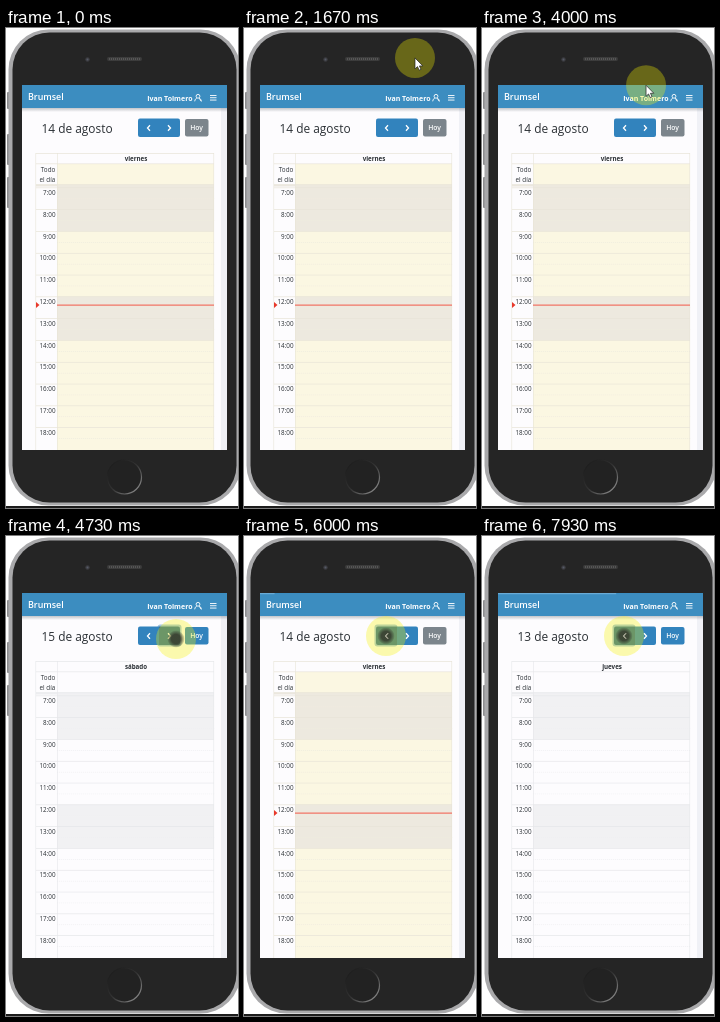
These frames come from a looping animation (232x480 px, 8000 ms). An HTML page with a canvas:

```html
<!DOCTYPE html>
<html lang="es">
<head>
<meta charset="utf-8">
<title>Agenda</title>
<style>
  html, body { margin: 0; width: 100%; height: 100%; overflow: hidden; background: #fff; }
  canvas { display: block; width: 232px; height: 480px; }
</style>
</head>
<body>
<canvas id="stage"></canvas>
<script>
const W = 232, H = 480, LOOP = 8000;
const FONT = '"Open Sans", "Noto Sans", sans-serif';
const BLUE = '#3c8dc0', BTN = '#3283bd', INK = '#2b3035', PAPER = '#fdfcfe';
const HOUR = 21.8, DAY_TOP = 159.5, COL = 51;

const canvas = document.getElementById('stage');
const ctx = canvas.getContext('2d');
const dpr = window.devicePixelRatio || 1;
canvas.width = W * dpr;
canvas.height = H * dpr;

// Pointer stops: time, x, y
const path = [
  [1190, 254, 92], [1400, 214, 76], [1670, 171, 30], [1930, 170, 19],
  [2200, 170, 19], [2730, 168, 9], [3930, 168, 9], [4000, 164, 57],
  [4330, 170, 103], [4870, 170, 103], [5270, 142, 100], [LOOP, 142, 100]
];

const between = (t, a, b) => t >= a && t < b;
const hourY = h => DAY_TOP + (h - 7) * HOUR;

function box(x, y, w, h, fill) {
  ctx.fillStyle = fill;
  ctx.fillRect(x, y, w, h);
}

function round(x, y, w, h, r, fill) {
  ctx.beginPath();
  ctx.roundRect(x, y, w, h, r);
  ctx.fillStyle = fill;
  ctx.fill();
}

function disc(x, y, r, fill) {
  ctx.beginPath();
  ctx.arc(x, y, r, 0, Math.PI * 2);
  ctx.fillStyle = fill;
  ctx.fill();
}

function line(points, color, width) {
  ctx.beginPath();
  points.forEach(([x, y], i) => i ? ctx.lineTo(x, y) : ctx.moveTo(x, y));
  ctx.strokeStyle = color;
  ctx.lineWidth = width;
  ctx.stroke();
}

function text(str, x, y, size, color, weight = 400, align = 'left') {
  ctx.font = `${weight} ${size}px ${FONT}`;
  ctx.textAlign = align;
  ctx.fillStyle = color;
  ctx.fillText(str, x, y);
}

function drawPhone() {
  box(0, 0, W, H, '#fff');
  [[64, 17], [106, 31], [149, 31]].forEach(([y, h]) => round(1, y, 3, h, 1, '#8c8c8e'));
  // The right edge runs past the stage
  round(2.5, 1.5, 232, 476, 40, '#a9a9ab');
  round(6.5, 4.5, 224, 470, 37, '#252525');
  box(0, 478, W, 2, '#1c1c1c');

  round(101, 29, 35, 4, 2, '#3c3c3c');
  for (let x = 103; x < 135; x += 2) box(x, 30, 1, 2, '#575757');
  disc(81.5, 31.5, 2.2, '#3d3d42');
  disc(81.5, 31.5, 1, '#555a66');

  disc(118.5, 449, 17.5, '#222');
  const rim = ctx.createLinearGradient(104, 436, 132, 464);
  rim.addColorStop(0, '#1c1c1c');
  rim.addColorStop(0.5, '#333');
  rim.addColorStop(1, '#8d8d8d');
  ctx.beginPath();
  ctx.arc(118.5, 449, 17, 0, Math.PI * 2);
  ctx.strokeStyle = rim;
  ctx.lineWidth = 1.2;
  ctx.stroke();
}

function drawHeader(t) {
  box(16, 57, 205, 365, '#f0f1f6');
  box(16, 80, 199, 342, PAPER);
  const shade = ctx.createLinearGradient(0, 80, 0, 84);
  shade.addColorStop(0, 'rgba(60,70,80,.3)');
  shade.addColorStop(1, 'rgba(60,70,80,0)');
  box(16, 80, 205, 4, shade);
  box(16, 57, 205, 23, BLUE);

  const load = [[4870, 5670], [5990, 6330], [7800, 8300]].find(([a, b]) => between(t, a, b));
  if (load) {
    const p = (t - load[0]) / (load[1] - load[0]);
    box(16, 57, 205 * Math.min(1, p * 2.2), 1.2, '#69abd6');
  }

  text('Brumsel', 22, 72.3, 8.9, '#fff', 600);
  text('Ivan Tolmero', 186.5, 72.8, 7, '#fff', 700, 'right');
  ctx.beginPath();
  ctx.arc(192, 68.3, 1.9, 0, Math.PI * 2);
  ctx.moveTo(188.7, 73.3);
  ctx.quadraticCurveTo(188.8, 70.8, 190.7, 70.4);
  ctx.moveTo(193.3, 70.4);
  ctx.quadraticCurveTo(195.2, 70.8, 195.3, 73.3);
  ctx.closePath();
  ctx.strokeStyle = '#fff';
  ctx.lineWidth = 0.9;
  ctx.stroke();
  for (let i = 0; i < 3; i++) box(204, 67 + i * 2.3, 6.5, 0.9, '#fff');
}

function drawButtons(t, today) {
  const nextPressed = between(t, 4470, 4600);
  const nextFocus = between(t, 4600, 5800);
  const prevPressed = between(t, 5730, 5930) || between(t, 7070, 7300);
  const prevFocus = t >= 5930;

  if (nextPressed || nextFocus) round(151.5, 88.5, 24, 22, 3, 'rgba(70,140,195,.5)');
  if (prevPressed || prevFocus) round(130.5, 88.5, 23, 22, 3, 'rgba(70,140,195,.5)');
  const tone = (pressed, focus) => pressed ? '#68767f' : focus ? '#2b6a98' : BTN;
  round(132, 90.5, 21, 18.5, [2, 0, 0, 2], tone(prevPressed, prevFocus));
  round(153, 90.5, 21, 18.5, [0, 2, 2, 0], tone(nextPressed, nextFocus));
  line([[144, 97.3], [141.5, 100], [144, 102.7]], '#fff', 1.3);
  line([[162, 97.3], [164.5, 100], [162, 102.7]], '#fff', 1.3);

  round(179, 91, 23.5, 17.5, 2, today ? '#7c858c' : BTN);
  text('Hoy', 190.6, 102.4, 6.8, '#fff', 600, 'center');
}

function drawCalendar(t, date, day, today) {
  const wide = 208 - COL;
  text(`${date} de agosto`, 35.5, 105, 11.9, INK, 500);
  text(day, 130, 133, 6.2, INK, 700, 'center');

  if (today) box(COL, 136, wide, 286, '#fbf7e2');
  box(30, 156.5, 178, 2, today ? '#ebe7df' : '#eeeff1');
  const off = today ? '#ede9df' : '#f1f1f3';
  box(COL, 157, wide, hourY(9) - 157, off);
  box(COL, hourY(12), wide, 2 * HOUR, off);

  const edge = today ? '#e8e4d8' : '#e6e7ea';
  const faint = today ? '#f0ecdf' : '#f0f0f2';
  [125, 135.5, 156.5].forEach(y => box(30, y, 178, 0.7, edge));
  for (let h = 7; h < 19; h++) {
    const y = hourY(h);
    box(30, y, 178, 0.7, edge);
    for (let x = COL; x < 208; x += 2) box(x, y + HOUR / 2, 1.2, 0.7, faint);
    text(`${h}:00`, 49.5, y + 7.4, 6.3, INK, 400, 'right');
  }
  [29.5, COL, 207.5].forEach(x => box(x, 125, 0.6, 297, edge));
  text('Todo', 49.3, 144, 6.3, INK, 400, 'right');
  text('el día', 49.3, 154, 6.3, INK, 400, 'right');

  if (today) {
    box(COL, 276.6, wide, 1, '#f2594a');
    ctx.beginPath();
    ctx.moveTo(30, 274);
    ctx.lineTo(33.5, 277);
    ctx.lineTo(30, 280);
    ctx.fillStyle = '#e8382b';
    ctx.fill();
  }
  if (date === 15 && t >= 5070) {
    round(53, 344.8, 151, 9.6, 1, '#3784b8');
    text('15:30 - Vanez, Teol', 54.5, 350.8, 4.4, '#fff', 700);
  }
}

function pointerAt(t) {
  const i = path.findIndex(p => p[0] > t);
  if (i < 1) return null;
  const [a, x0, y0] = path[i - 1], [b, x1, y1] = path[i];
  const p = (t - a) / (b - a);
  const e = p * (2 - p);
  return [x0 + (x1 - x0) * e, y0 + (y1 - y0) * e];
}

function pressDot(x, y, rgb, r) {
  const glow = ctx.createRadialGradient(x, y, r * 0.55, x, y, r);
  glow.addColorStop(0, `rgba(${rgb},.78)`);
  glow.addColorStop(1, `rgba(${rgb},.1)`);
  disc(x, y, r, glow);
}

function drawPointer(t) {
  const pos = pointerAt(t);
  if (!pos) return;
  const [x, y] = pos;
  disc(x, y, 20, 'rgba(245,242,0,.32)');

  const red = between(t, 4470, 4600) || between(t, 5730, 5930) || between(t, 7070, 7300);
  const dark = between(t, 4600, 4870) || t >= 5930;
  if (red) {
    disc(x, y, 7.5, 'rgba(125,30,30,.72)');
    disc(x, y, 4.5, 'rgba(75,55,45,.6)');
  } else if (dark) {
    pressDot(x, y, '48,48,40', 8.5);
  }
  if ((red || dark) && t > 5700) {
    line([[144, 97.3], [141.5, 100], [144, 102.7]], '#d5d8cb', 1);
  }

  if (t < 4250) {
    ctx.beginPath();
    [[0, 0], [0, 11], [2.5, 8.7], [4.2, 12.3], [6, 11.4], [4.4, 8], [7.8, 8]]
      .forEach(([dx, dy]) => ctx.lineTo(x + dx, y + dy));
    ctx.closePath();
    ctx.fillStyle = '#fff';
    ctx.fill();
    ctx.strokeStyle = '#222';
    ctx.lineWidth = 0.7;
    ctx.stroke();
  }
}

function draw(now) {
  const t = now % LOOP;
  const [date, day] = between(t, 4600, 5930) ? [15, 'sábado']
    : t >= 7330 ? [13, 'jueves'] : [14, 'viernes'];
  const today = date === 14;

  ctx.setTransform(dpr, 0, 0, dpr, 0, 0);
  drawPhone();
  drawHeader(t);
  drawButtons(t, today);
  drawCalendar(t, date, day, today);
  drawPointer(t);
}

const start = performance.now();
function tick() {
  draw(performance.now() - start);
  requestAnimationFrame(tick);
}
tick();
</script>
</body>
</html>
```
